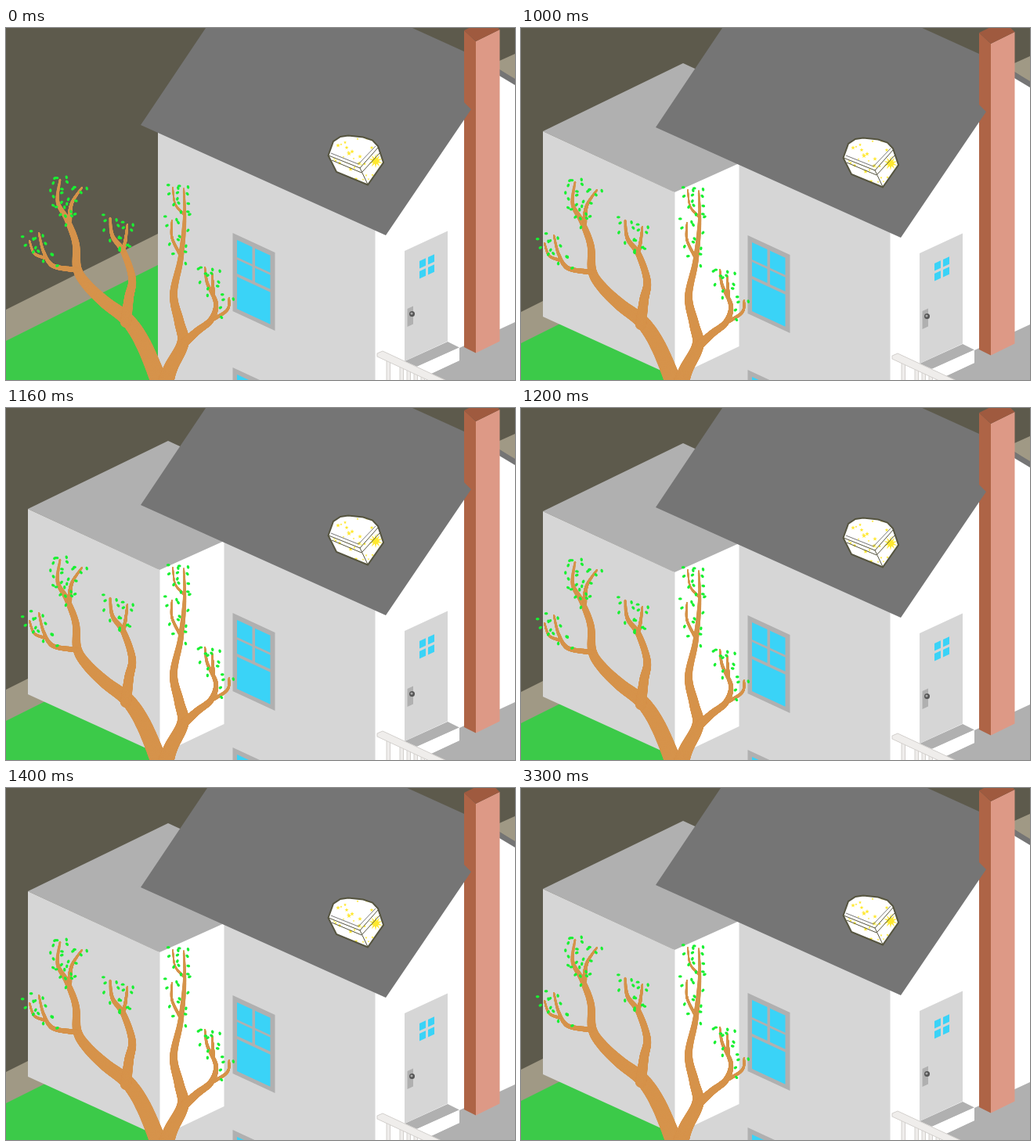
An HTML page with a canvas that plays this animation: 650x450 px, repeating every 4500 ms.

```html
<!DOCTYPE html>
<html lang="en">
<head>
<meta charset="utf-8">
<title>House extension</title>
<style>
html, body { margin: 0; width: 650px; height: 450px; overflow: hidden; }
canvas { display: block; }
</style>
</head>
<body>
<canvas id="stage" width="650" height="450"></canvas>
<script>
const ctx = document.getElementById('stage').getContext('2d');

const LOOP = 4500, DROP = 1000, STEP = 100, STEPS = 5, SHAKE = 3;
const SLOPE = .463;

const C = {
  earth: '#5d5a4c', path: '#a09985', grass: '#3cca49', wall: '#d6d6d6',
  grey: '#b0b0b0', roof: '#757575', glass: '#3ad3f7', bark: '#d6934b',
  leaf: '#19f032', brickDark: '#ae6446', brickTop: '#9f5a3f', brick: '#dd9986',
  rail: '#efedeb', railEdge: '#d3d0cd', ink: '#55543f', star: '#ffe82e'
};

function seeded(seed) {
  return () => (seed = seed * 16807 % 2147483647) / 2147483647;
}

// Coordinates are flat lists: x, y, x, y, ...
function trace(pts) {
  ctx.beginPath();
  for (let i = 0; i < pts.length; i += 2) ctx.lineTo(pts[i], pts[i + 1]);
}

function poly(color, ...pts) {
  trace(pts);
  ctx.closePath();
  ctx.fillStyle = color;
  ctx.fill();
}

function line(color, width, ...pts) {
  trace(pts);
  ctx.strokeStyle = color;
  ctx.lineWidth = width;
  ctx.stroke();
}

function dot(color, x, y, rx, ry = rx, turn = 0) {
  ctx.beginPath();
  ctx.ellipse(x, y, rx, ry, turn, 0, Math.PI * 2);
  ctx.fillStyle = color;
  ctx.fill();
}

// A parallelogram with upright sides.
function pane(color, x, y, w, h, slope = SLOPE) {
  const dy = w * slope;
  poly(color, x, y, x + w, y + dy, x + w, y + dy + h, x, y + h);
}

function star(x, y, r, points = 5) {
  const pts = [];
  for (let i = 0; i < points * 2; i++) {
    const a = i * Math.PI / points, d = i % 2 ? r * .42 : r;
    pts.push(x + d * Math.sin(a), y - d * Math.cos(a));
  }
  poly(C.star, ...pts);
}

function spline(a, b, c, d, t) {
  return b + .5 * t * (c - a + t * (2 * a - 5 * b + 4 * c - d + t * (3 * (b - c) + d - a)));
}

// Point at u (0 to 1) on a smooth curve through the given knots.
function along(pts, u) {
  const last = pts.length / 2 - 1;
  const i = Math.min(last - 1, Math.floor(u * last));
  const knot = (j, k) => pts[2 * Math.max(0, Math.min(last, j)) + k];
  return [0, 1].map(k =>
    spline(knot(i - 1, k), knot(i, k), knot(i + 1, k), knot(i + 2, k), u * last - i));
}

function drawGround() {
  poly(C.path, 0, 360, 194, 263, 194, 460, 0, 460);
  poly(C.grass, 0, 400, 194, 303, 194, 460, 0, 460);
  poly(C.path, 630, 42, 650, 33, 650, 66, 630, 53);
}

function drawHouse() {
  poly('#fff', 471, 250, 585, 100, 630, 58, 650, 70, 650, 460, 471, 460);
  poly(C.roof, 630, 53, 650, 65, 650, 73, 630, 61);
  poly(C.wall, 194, 130, 471.5, 255, 471.5, 460, 194, 460);
}

function drawExtension() {
  poly(C.grey, 28, 129, 207, 42, 300, 85, 279, 171, 196, 207);
  poly(C.wall, 28, 129, 196.5, 207, 196.5, 443, 28, 366);
  poly('#fff', 196.5, 207, 278.5, 170, 278.5, 404, 196.5, 443);
}

function drawWindow(y) {
  pane(C.grey, 289.5, y, 54, 100);
  for (const x of [295, 318]) {
    const top = y + 9 + (x - 295) * SLOPE;
    pane(C.glass, x, top, 19.5, 22);
    pane(C.glass, x, top + 25, 19.5, 18);
  }
  pane(C.glass, 295, y + 56, 42.5, 41);
}

function drawPorch() {
  poly(C.grey, 650, 376, 579, 409, 579, 425, 534, 446, 560, 462, 650, 462);
  poly(C.grey, 509, 426, 564, 401, 579, 408.5, 525, 433);
  poly('#fff', 579, 408.5, 579, 425, 534, 446, 520, 435);
  pane(C.wall, 509, 285, 55, 141, -SLOPE);
  for (const x of [528, 539]) {
    for (const y of [298, 311]) pane(C.glass, x, y - (x - 528) * SLOPE, 8, 9.5, -SLOPE);
  }
  pane(C.grey, 512.5, 359, 7.5, 23, -SLOPE);
  dot('#555', 518.5, 365.5, 3.5);
  dot('#aaa', 518, 365, 1.6);
}

function drawRailing() {
  const bar = x => {
    pane(C.rail, x, 421 + (x - 485) * SLOPE, 4.5, 50);
    line(C.railEdge, 1, x, 421 + (x - 485) * SLOPE, x, 460);
    line(C.railEdge, 1, x + 4.5, 423 + (x - 485) * SLOPE, x + 4.5, 460);
  };
  bar(486);
  for (let x = 503; x < 540; x += 9) bar(x);
  poly(C.rail, 474, 416, 481, 413, 582, 460, 560, 460, 474, 420);
  line(C.railEdge, 1, 582, 460, 481, 413, 474, 416, 474, 420, 560, 460);
}

function drawChimney() {
  poly(C.brickDark, 585, 3, 600, 17, 600, 415.5, 585, 408);
  poly(C.brick, 600, 17, 630.5, 2, 630.5, 400.5, 600, 415.5);
  poly(C.brickTop, 585, 3, 616, -12, 630.5, 2, 600, 17);
}

function drawRoof() {
  poly(C.roof, 172, 124, 485, 265, 594, 104, 585, 95, 585, 30, 497, -10, 261.7, -10);
}

function drawChest() {
  const outline = [411.5, 163, 418, 145, 427, 139, 437, 137.5, 456, 139.5,
    468, 143.5, 475, 151, 482, 172, 462, 200.5, 422, 184];
  const random = seeded(11);
  poly('#fff', ...outline);
  ctx.save();
  ctx.clip();
  for (let i = 0; i < 36; i++) {
    star(414 + i * 23 % 62, 141 + random() * 55, 1.2 + 2.6 * random() ** 2);
  }
  star(472, 170, 9, 10);
  ctx.restore();
  line('#777', 1, 415, 160, 450, 174, 472, 151);
  line(C.ink, 1, 412, 163, 452, 179, 475, 153);
  line(C.ink, 1, 416, 169, 454, 185, 478, 159);
  line(C.ink, 1, 452, 179, 462, 200);
  trace(outline);
  ctx.closePath();
  ctx.lineWidth = 2;
  ctx.stroke();
}

// Each branch tapers evenly along a few knots and carries leaves near its tip.
const BRANCHES = [
  { from: 22, to: 2.5, leaves: 17, pts: [198, 458, 176, 405, 155, 373, 127, 351, 104, 329,
    91, 308, 89, 275, 78, 245, 66, 222, 69, 194] },
  { from: 6, to: 2, leaves: 9, pts: [81, 246, 84, 224, 97, 204] },
  { from: 7, to: 2, leaves: 8, pts: [90, 309, 60, 304, 48, 286, 42, 262] },
  { from: 4, to: 2, leaves: 6, pts: [50, 294, 36, 288, 30, 272] },
  { from: 14, to: 2.5, leaves: 9, pts: [153, 376, 157, 345, 161, 320, 150, 286, 136, 266, 133, 243] },
  { from: 5, to: 2, leaves: 7, pts: [150, 285, 153, 268, 155, 251] },
  { from: 20, to: 2, leaves: 14, pts: [204, 452, 211, 433, 226, 402, 221, 375, 214, 340,
    223, 295, 228, 245, 227, 205] },
  { from: 4, to: 2, leaves: 6, pts: [223, 291, 212, 268, 212, 246] },
  { from: 3, to: 1.5, leaves: 6, pts: [227, 238, 216, 225, 213, 204] },
  { from: 11, to: 2, leaves: 8, pts: [228, 402, 245, 387, 262, 373, 268, 352, 257, 326, 254, 306] },
  { from: 4, to: 2, leaves: 5, pts: [265, 340, 264, 326, 263, 313] },
  { from: 5, to: 2, leaves: 4, pts: [258, 376, 282, 361, 285, 345] }
];

function drawTree() {
  for (const { from, to, pts } of BRANCHES) {
    for (let u = 0; u <= 1; u += .003) {
      dot(C.bark, ...along(pts, u), (from + (to - from) * u) / 2);
    }
  }
  const random = seeded(42);
  for (const { leaves, pts } of BRANCHES) {
    const reach = 2.4 / (pts.length / 2 - 1);
    for (let i = 0; i < leaves; i++) {
      const [x, y] = along(pts, Math.max(0, 1 - reach * (i / leaves) ** 1.3));
      const side = i % 2 ? 1 : -1;
      dot(C.leaf, x + side * (4 + 6 * random()), y - 6 + 7 * random(), 2.4, 1.7, i * 1.3);
    }
  }
}

function drawScene(extended, shift) {
  ctx.setTransform(1, 0, 0, 1, 0, 0);
  ctx.fillStyle = C.earth;
  ctx.fillRect(0, 0, 650, 450);
  ctx.translate(0, shift);
  drawGround();
  drawHouse();
  if (extended) drawExtension();
  drawWindow(262);
  drawWindow(434);
  drawPorch();
  drawRailing();
  drawChimney();
  drawRoof();
  drawChest();
  drawTree();
}

let shown = '';

function render(now) {
  const t = now % LOOP;
  const extended = t >= DROP;
  const step = Math.floor((t - DROP) / STEP);
  const shift = extended && step < STEPS && step % 2 === 0 ? SHAKE : 0;
  const state = extended + ':' + shift;
  if (state !== shown) {
    drawScene(extended, shift);
    shown = state;
  }
}

const start = performance.now();
function tick() {
  render(performance.now() - start);
  requestAnimationFrame(tick);
}
tick();
</script>
</body>
</html>
```
